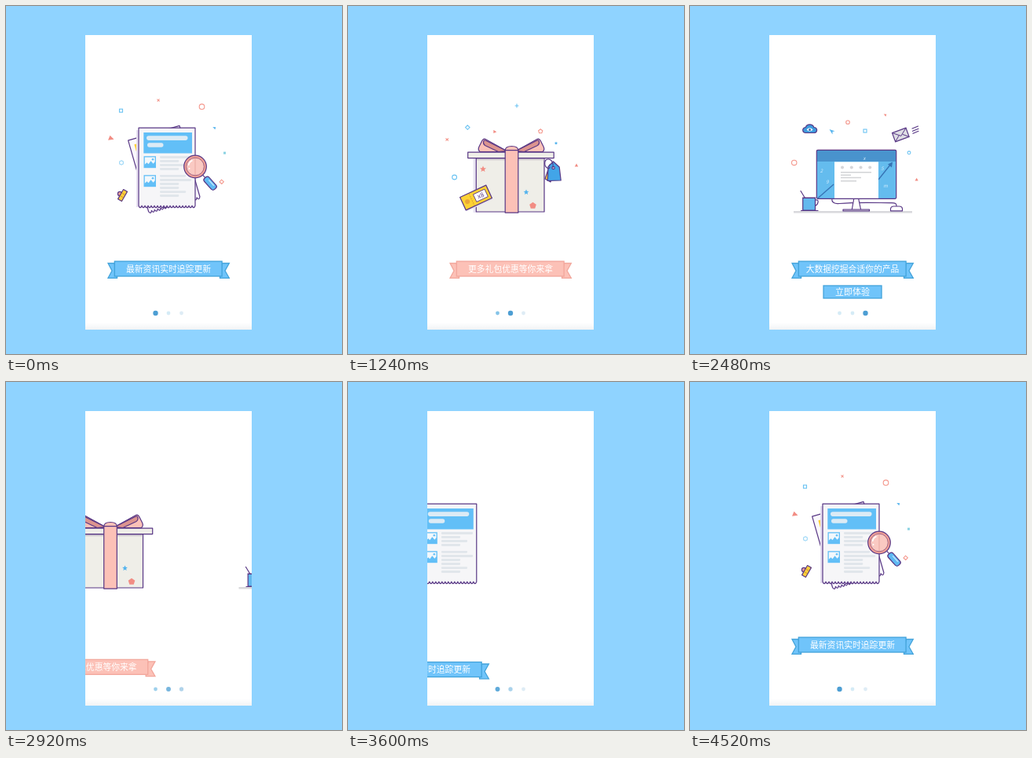
These frames come from a looping animation (428 px wide and 443 px high, 4.56 s). An HTML page:

```html
<!DOCTYPE html>
<html lang="zh">
<head>
<meta charset="utf-8">
<title>Onboarding</title>
<style>
  html, body { margin: 0; width: 100%; height: 100%; overflow: hidden; background: #8fd3ff; }
  svg { display: block; width: 100vw; height: 100vh; }
  text { font-family: "Noto Sans CJK SC", "Noto Sans CJK", "Noto Sans", sans-serif; font-size: 10.8px; text-anchor: middle; fill: #fff; }
  .ink { stroke: #583785; stroke-width: 1.2; stroke-linejoin: round; stroke-linecap: round; }
  .blue { stroke: #6bc3f2; fill: none; stroke-width: 1.1; }
  .red { stroke: #f4978c; fill: none; stroke-width: 1.1; }
  .fb { fill: #55b4ee; }
  .fr { fill: #f28d84; }
  .bars { stroke: #e1e6eb; stroke-width: 2.8; stroke-linecap: round; }
  .tiny { font-size: 6px; font-style: italic; fill: #d9f0ff; }
</style>
</head>
<body>
<svg viewBox="0 0 428 443">
  <defs>
    <clipPath id="screen"><rect x="101" y="37" width="212" height="375"/></clipPath>
    <linearGradient id="foot" x1="0" y1="0" x2="0" y2="1">
      <stop offset="0" stop-color="#fff"/><stop offset="1" stop-color="#f1f3f5"/>
    </linearGradient>
    <g id="star"><path d="M0-4 1.2-1.4 4-1.2 1.8.7 2.5 3.5 0 2-2.5 3.5-1.8.7-4-1.2-1.2-1.4Z"/></g>
    <g id="photo">
      <rect width="15.5" height="15" fill="#62bff7"/>
      <path d="M1.3 1.3H14.2V7L12 9.5 9 6 6 10 4 8 1.3 10.5Z" fill="#f2f8fc"/>
      <circle cx="11.5" cy="4" r="1.3" fill="#62bff7"/>
    </g>
  </defs>
  <rect width="428" height="443" fill="#8fd3ff"/>
  <g clip-path="url(#screen)">
    <rect x="101" y="37" width="212" height="375" fill="#fff"/>
    <rect x="101" y="403" width="212" height="9" fill="url(#foot)"/>

    <!-- news -->
    <g class="page">
      <g class="bits">
        <rect class="blue" x="144.5" y="131.2" width="4" height="4"/>
        <path class="red" d="M192.4 118.6l3.4 2.8M195.4 118.2l-2.6 3.6"/>
        <circle class="red" cx="249.5" cy="128.2" r="3.3"/>
        <path class="fb" d="M263.3 154l4 .2-1 3Z"/>
        <path class="fr" d="M132.5 164.8l5 5-7.5 1Z"/>
        <path class="blue" d="M147 196.8l2.3 1.3v2.8l-2.3 1.3-2.3-1.3v-2.8Z" opacity=".7"/>
        <rect x="277" y="185.6" width="3" height="3" fill="#8bd2e2"/>
        <path class="red" d="M274.5 221.2l2.8 2.5-2.5 2.8-2.8-2.5Z"/>
        <circle cx="145" cy="239" r="2.6" class="ink" fill="#f2a49a"/>
        <g transform="translate(148.5 241) rotate(30)">
          <rect class="ink" x="-2.8" y="-7" width="5.6" height="14" fill="#fdcf3a"/>
          <path d="M-2-2H2M-2 2H2" stroke="#c58a2d" stroke-width=".8"/>
        </g>
      </g>
      <g id="sheet">
        <path id="back" class="ink" fill="#faf8fc"/>
        <rect x="177" y="166" width="30" height="18" fill="#fdcf3a"/>
        <path d="M177 190h30M177 196h30" stroke="#e1e6eb" stroke-width="2.5"/>
      </g>
      <rect x="166" y="158" width="72" height="98" fill="#e6dff0"/>
      <path id="front" class="ink" fill="#f6f6f8"/>
      <rect x="175.3" y="161" width="61.7" height="26.5" fill="#62bff7"/>
      <g fill="#dcebf5">
        <rect x="179" y="165.3" width="52.5" height="5.6" rx="2.8"/>
        <rect x="180" y="174.3" width="20.5" height="5.4" rx="2.7"/>
      </g>
      <use href="#photo" x="175.5" y="191.2"/>
      <use href="#photo" x="175.5" y="215.2"/>
      <path class="bars" d="M197.3 192.5H235M197.3 197.5H219M197.3 202.5H228M197.3 207.5H219M197.3 216.3H228M197.3 221.5H235M197.3 226.5H219M197.3 231.5H219M197.3 236.6H228M197.3 241.5H219"/>
      <g id="lens">
        <g transform="translate(241 204.5) rotate(48)">
          <path class="ink" d="M14 0h8" stroke-width="3"/>
          <rect class="ink" x="19" y="-4" width="19" height="8" rx="3" fill="#5fb9f2"/>
          <path d="M24-1.5h10" stroke="#c6e8fd" stroke-width="1.3"/>
        </g>
        <circle class="ink" cx="241" cy="204.5" r="14.3" fill="#f0a096"/>
        <circle cx="241" cy="204.5" r="11.3" fill="#fac9c2" stroke="#8d4f78" stroke-width=".8"/>
        <path d="M241 194v21" stroke="#e9a8a1"/>
        <path d="M232.5 203a8.5 8.5 0 0 1 5-6.5" fill="none" stroke="#fff" stroke-width="1.6"/>
        <circle cx="233.5" cy="207" r="1" fill="#fff"/>
      </g>
    </g>

    <!-- gift -->
    <g class="page">
      <g class="bits">
        <path class="blue" d="M215 124.6v4.8M212.6 127h4.8"/>
        <path class="blue" d="M152.3 151.9l2.7 2.7-2.7 2.7-2.7-2.7Z"/>
        <path class="fr" d="M185.3 157.8l4 2.4-4 1.8Z"/>
        <path class="red" d="M245.2 156.8l2.6 1.9-1 3h-3.2l-1-3Z"/>
        <use href="#star" class="fb" transform="translate(265 174.6) scale(.55)"/>
        <path class="fr" d="M291 200.6l2.2 4h-4.4Z"/>
        <circle class="blue" cx="135.6" cy="218" r="2.9"/>
        <path class="red" d="M124.5 168.5l3.4 3.2M127.9 168.5l-3.4 3.2"/>
      </g>
      <g id="tag">
        <path class="ink" d="M257 202l-6 18 7 4 5-17Z" fill="#fdcf3a"/>
        <path class="ink" d="M261.5 198l-6.5 6.5-.8 18 17-.5-2-17Z" fill="#42a5e8"/>
        <circle class="ink" cx="261.5" cy="206" r="1.7" fill="#fff"/>
        <path class="ink" d="M261 206c1-7-2-11-6-11-4 0-5 4-4 8 2 4 6 5 6 2" fill="none"/>
      </g>
      <rect x="159.5" y="194" width="5" height="69" fill="#e9e5f2"/>
      <rect class="ink" x="163.3" y="194" width="86.7" height="68" fill="#efeee8"/>
      <path d="M164 195.5h85.5" stroke="#d5d2d4" stroke-width="2"/>
      <path class="ink" d="M204 185.5L175 169.5q-2-1-4 1.5l-4 8q-2 4 1 6.5ZM212 185.5L241 169.5q2-1 4 1.5l4 8q2 4-1 6.5Z" fill="#fcc1b7"/>
      <path class="ink" d="M202 184.5L175 171q-2-.5-2.5 2-.3 3 2 4.5l17 8ZM214 184.5L241 171q2-.5 2.5 2 .3 3-2 4.5l-17 8Z" fill="#dc948f" stroke-width=".9"/>
      <rect class="ink" x="152.7" y="186.2" width="109.5" height="7.4" fill="#efeee8"/>
      <path class="ink" d="M200.2 184q0-5.5 8.3-5.5t8.3 5.5Z" fill="#fcc1b7"/>
      <rect class="ink" x="200.2" y="183.7" width="16.6" height="79.5" fill="#fcc1b7"/>
      <use href="#star" class="fr" x="172" y="207.6"/>
      <use href="#star" class="fb" transform="translate(227 237) scale(.85)"/>
      <path class="fr" d="M235.5 249.7l4.3 3.1-1.6 5h-5.4l-1.6-5Z"/>
      <g id="coupon">
        <rect x="-18" y="-7" width="37" height="18" fill="#e6e1ed"/>
        <rect class="ink" x="-18.3" y="-9" width="36.6" height="18" fill="#fdd235"/>
        <path d="M-6-8V8" stroke="#c58a2d" stroke-width=".8" stroke-dasharray="1.5 1.5"/>
        <circle cx="-12" r="3" fill="#eaa53a"/>
        <rect x="-1.5" y="-5.2" width="16" height="10.4" fill="#fff" stroke="#583785" stroke-width=".8"/>
        <text x="6.5" y="2.8" style="font-size:8px;fill:#583785">x8</text>
      </g>
    </g>

    <!-- data -->
    <g class="page">
      <g class="bits">
        <path class="ink" d="M147 161.5q-3.5-.5-3.3-4 .5-3 3.6-3 1-3.7 5.2-3.7t5.3 3.7q3.6.2 3.8 3.4 0 3-3.2 3.6Z" fill="#3e9bdd"/>
        <path d="M148.5 157.5q4-4.5 8 0-4 4-8 0Z" fill="#fff"/><circle cx="152.5" cy="157.4" r="1.5" fill="#3e70b0"/>
        <path class="fb" d="M177.5 157l7 2.2-3 .9 0 3.4Z"/>
        <circle class="red" cx="201" cy="148" r="2.3"/>
        <rect class="blue" x="221" y="157" width="4" height="4"/>
        <path class="fr" d="M246.7 137.5l3.6.3-1 2.9Z"/>
        <circle class="blue" cx="279" cy="186.8" r="1.9"/>
        <circle class="red" cx="132.7" cy="199.4" r="3.2" stroke-width="1.4"/>
        <path class="fr" d="M288.7 218.8l2 3.8h-4.2Z"/>
        <g transform="translate(268.3 164) rotate(-20)" class="ink">
          <rect x="-9.3" y="-6" width="18.6" height="12" fill="#dedde4"/>
          <path d="M-9.3-6L0 1.5 9.3-6M-9.3 6l6.5-5.5M9.3 6L2.8.5" fill="none" stroke-width=".9"/>
        </g>
        <path class="ink" d="M283 156l7.5-3M283.5 159.3l7.5-3M284 162.3l7-3" stroke-width="1.5"/>
      </g>
      <path d="M132 262.3H283" stroke="#d8d8dc" stroke-width="2.4"/>
      <path class="ink" d="M181 245c-1 5 3 7 9 6.5 22-2 45-1 67-.8 5 0 6 1 6 4" fill="none" stroke-width="1"/>
      <path class="ink" d="M208.8 245h5.8l3 14.5h-11.4Z" fill="#fff"/>
      <rect class="ink" x="195" y="259" width="33.5" height="2" fill="#cfcad8"/>
      <path class="ink" d="M255.5 260.8v-2.5q.3-3.3 4-3.3h7q4 0 4 3.6v2.2Z" fill="#fff"/>
      <path class="ink" d="M141 235.5l5.5 9" stroke-width="2.6"/>
      <path class="ink" d="M159 247q5-1 4 3t-4 4" fill="none"/>
      <rect class="ink" x="143.7" y="244.5" width="15.8" height="15.5" fill="#62b9ee"/>
      <path class="ink" d="M143.5 244H160M141.5 260.5H163" stroke-width="1.6"/>
      <rect x="161.3" y="183.3" width="101.4" height="62" rx="1.5" fill="#64bcee"/>
      <rect x="162" y="184" width="100" height="14" fill="#4993cd"/>
      <path d="M163 244.5L183 227M240 221L256 201" stroke="#3673b4" stroke-width="1.3"/>
      <path d="M258 198.5l-1 7-5-4Z" fill="#3673b4"/>
      <rect x="184" y="198.4" width="56" height="47" fill="#fff"/>
      <g fill="#d6d6d8"><circle cx="194" cy="205.5" r="2"/><circle cx="205.8" cy="205.5" r="2"/><circle cx="217.5" cy="205.5" r="2"/><circle cx="229.2" cy="205.5" r="2"/></g>
      <path d="M192 211.7h39M192 215.2h13M192 218.6h26M192 222.8h20" stroke="#d2d3d6" stroke-width="1.5"/>
      <text class="tiny" x="167.5" y="212">2</text><text class="tiny" x="175" y="226">9</text>
      <text class="tiny" x="245" y="209">5</text><text class="tiny" x="249" y="231">m</text>
      <text class="tiny" x="222" y="196">x</text>
      <rect class="ink" x="161.3" y="183.3" width="101.4" height="62" rx="1.5" fill="none" stroke-width="1.5"/>
    </g>

    <g id="ribbons"></g>
    <g id="button">
      <rect x="170" y="356" width="74" height="16" fill="#70c4fa" stroke="#43a3da" stroke-width="1.3"/>
      <text x="207" y="368" style="font-size:11px">立即体验</text>
    </g>
    <g id="dots"></g>
  </g>
</svg>
<script>
  const LOOP = 4560, STEP = 40, LEAD = 281, PULL = 95, GAP = 240, RIBBON_GAP = 300;
  const swipes = [
    { c: 281, from: 0, to: 1, lag: 28 },
    { c: 1580, from: 1, to: 2, lag: 20 },
    { c: 2846, from: 2, to: 1, lag: 0 },
    { c: 3529, from: 1, to: 0, lag: 12 }
  ];
  const centers = [[206, 188], [208, 161], [208, 195]];
  const $ = id => document.getElementById(id);
  const clamp = x => Math.max(0, Math.min(1, x));
  const mix = (a, b, k) => a + (b - a) * k;
  const move = (el, tf) => el.setAttribute('transform', tf);
  const about = (x, y, tf) => `translate(${x} ${y}) ${tf} translate(${-x} ${-y})`;

  // paper outline with a scalloped lower edge
  const paper = (x, y, w, h) => `M${x} ${y}h${w}v${h}${'q-2 5 -4 0'.repeat(w / 4)}Z`;
  $('front').setAttribute('d', paper(169, 155.2, 72, 99));
  $('back').setAttribute('d', paper(171, 159, 68, 94));

  const ribbon = (label, fill, line) => `<g>
    <path d="M138 327.5H130L135 337 130 346.3H141.5V340ZM275.5 327.5H284.3L279 337 284.3 346.3H272.5V340Z"
      fill="${fill}" stroke="${line}" stroke-width="1.3"/>
    <rect x="138.3" y="325" width="136.8" height="19" fill="${fill}" stroke="${line}" stroke-width="1.3"/>
    <text x="207" y="338.6">${label}</text></g>`;
  $('ribbons').innerHTML =
    ribbon('最新资讯实时追踪更新', '#70c4fa', '#43a3da') +
    ribbon('更多礼包优惠等你来拿', '#fcc1b7', '#f2a79c') +
    ribbon('大数据挖掘合适你的产品', '#70c4fa', '#43a3da');
  $('dots').innerHTML = [190.5, 207, 223.5].map(x => `<circle cx="${x}" cy="391"/>`).join('');

  const pages = [...document.querySelectorAll('.page')];
  const bits = [...document.querySelectorAll('.bits')];
  const ribbons = [...$('ribbons').children];
  const dots = [...$('dots').children];

  // dot colours for each page
  const on = [77, 158, 211], mid = [133, 196, 232], pale = [213, 235, 246], faint = [222, 236, 245];
  const palette = [[on, pale, faint], [mid, on, faint], [pale, pale, on]];

  const glide = t => t <= -LEAD ? 0
    : t < 0 ? 0.5 * (1 + t / LEAD) ** 1.5
    : 1 / (1 + Math.exp(-t / PULL));

  function draw(t) {
    let pos = 0, ribbonPos = 0;
    const pop = [1, 0, 0], sway = [0, 0, 0];
    for (const { c, from, to, lag } of swipes) {
      const d = t - c;
      pos += (to - from) * glide(d);
      ribbonPos += (to - from) * glide(d - lag);
      if (d < -LEAD) continue;
      pop[from] *= clamp(1 - (d + LEAD) / 230);
      pop[to] = 1 - (1 - clamp((d - 150) / 210)) ** 2;
      sway[to] = (1 - clamp((d - 150) / 450)) ** 2;
    }

    pages.forEach((el, i) => {
      move(el, `translate(${GAP * (i - pos)} 0)`);
      move(bits[i], about(...centers[i], `scale(${pop[i]})`));
      const x = RIBBON_GAP * (i - ribbonPos);
      move(ribbons[i], `translate(${x} ${0.3 * Math.abs(x)})`);
      if (i === 2) move($('button'), `translate(${x} 0) ` + about(207, 364, `scale(${pop[2]})`));
    });

    const [news, gift] = pop;
    move($('sheet'), `translate(${-4 * news} ${news}) ` + about(205, 205, `rotate(${-16 * news})`));
    move($('lens'), about(215, 204, `scale(${news})`));
    move($('tag'), about(256, 198, `rotate(${-45 * sway[1]}) scale(${gift ? 1 : 0})`));
    const k = Math.min(1, gift * 1.06);
    const size = gift ? Math.min(1, 0.45 + 0.6 * k) : 0;
    move($('coupon'), `translate(${mix(257, 163, k)} ${mix(236, 244, k) + 10 * sway[1]}) rotate(-25) scale(${size})`);

    const p = Math.max(0, Math.min(1.9999, pos)), a = Math.floor(p);
    dots.forEach((dot, i) => {
      const rgb = palette[a][i].map((v, n) => Math.round(mix(v, palette[a + 1][i][n], p - a)));
      dot.setAttribute('fill', `rgb(${rgb})`);
      dot.setAttribute('r', 2.4 + 0.8 * Math.max(0, 1 - Math.abs(i - p)));
    });
  }

  const start = performance.now();
  function tick() {
    const t = (performance.now() - start) % LOOP;
    draw(Math.floor(t / STEP) * STEP);
    requestAnimationFrame(tick);
  }
  tick();
</script>
</body>
</html>
```
